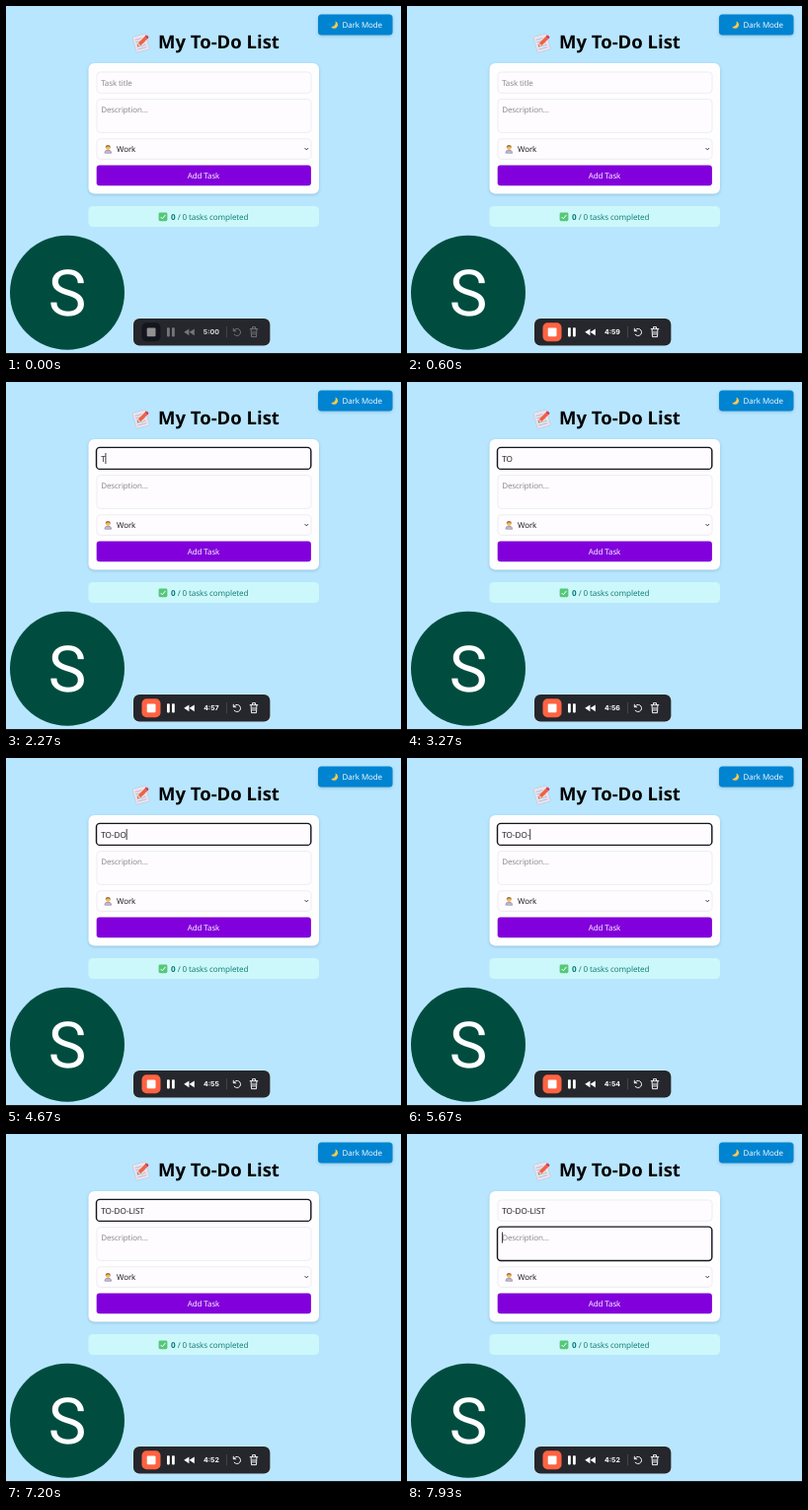
Animation, 400 px wide and 353 px high, one loop 8000 ms. Source, as an HTML page:

```html
<!DOCTYPE html>
<html lang="en">
<head>
<meta charset="utf-8">
<title>My To-Do List</title>
<style>
html, body { margin: 0; width: 100%; height: 100%; overflow: hidden; background: #b8e6fe; }
svg { display: block; width: 400px; height: 353px; }
text {
  font-family: "Open Sans", "Noto Sans", sans-serif;
  font-size: 8px; letter-spacing: -.1px; white-space: pre;
  text-rendering: geometricPrecision;
}
.field { fill: #fefcff; stroke: #e6e5ec; stroke-width: .7; }
.hint { fill: #858585; }
.soft { filter: drop-shadow(0 1px 1.5px rgba(20, 60, 90, .22)); }
#title { font-size: 18.5px; font-weight: 700; letter-spacing: 0; }
#entry { font-size: 8.2px; letter-spacing: 0; }
#count { font-size: 8.15px; }
#initial { font-family: Roboto, sans-serif; font-size: 65px; letter-spacing: 0; }
#clock { font-family: Inter, sans-serif; font-size: 7px; font-weight: 700; letter-spacing: 0; }
</style>
</head>
<body>
<svg viewBox="0 0 400 353">
  <rect width="400" height="353" fill="#b8e6fe"/>
  <rect y="352" width="400" height="1" fill="#1c1c1c"/>

  <!-- theme button -->
  <g class="soft"><rect x="316" y="8.5" width="75.5" height="21" rx="3.5" fill="#0084d1"/></g>
  <path d="M333.6 15.4A3.8 3.8 0 1 1 329.2 21.2A4.6 4.6 0 0 0 333.6 15.4Z" fill="#fbc94a"/>
  <text x="340.6" y="22.1" fill="#fff">Dark Mode</text>

  <!-- heading -->
  <g transform="translate(136.5 37)">
    <g transform="rotate(-15)">
      <rect x="-6.8" y="-7.5" width="13.6" height="16.4" rx="1" fill="#ece4ef" stroke="#b9bfd0" stroke-width=".5"/>
      <path d="M-5-4H2M-5-1.5H4M-5 1H4M-5 3.5H4.5M-5 6H4.5" stroke="#a3b0c8" stroke-width=".7"/>
    </g>
    <g transform="scale(.86)">
      <path d="M-4 4.5L-3 .8L4.5-7L7.6-4L0 3.6Z" fill="#f0613f"/>
      <path d="M4.5-7L6-8.3Q7.3-9 8.5-7.7T9-5.4L7.6-4Z" fill="#d3405b"/>
      <path d="M-4 4.5L-3 .8L0 3.6Z" fill="#f5c69a"/>
      <path d="M-4 4.5L-3.6 3L-2.5 4.1Z" fill="#443"/>
    </g>
  </g>
  <text id="title" x="154" y="43.3">My To-Do List</text>

  <!-- form -->
  <g class="soft"><rect x="83.5" y="58" width="233.5" height="132.5" rx="6" fill="#fffeff"/></g>
  <rect class="field" x="92" y="67" width="217" height="21.3" rx="3.5"/>
  <rect class="field" x="92" y="94.5" width="217" height="33.8" rx="3.5"/>
  <rect class="field" x="92" y="134.8" width="217" height="20.6" rx="3.5"/>
  <rect id="ring" x="91.5" y="66.4" width="217.3" height="22" rx="3.5" fill="none" stroke="#15161c" stroke-width="1.4"/>
  <text id="hint" class="hint" x="96.2" y="80.7">Task title</text>
  <text id="entry" x="96.2" y="80.7" fill="#111"></text>
  <text class="hint" x="96.2" y="108.4">Description...</text>
  <rect id="caret" width=".8" height="11" fill="#111"/>

  <g transform="translate(103.3 145.3) scale(.86)">
    <path d="M-4.4 5Q-4.4 .6 0 .6T4.4 5Z" fill="#ab93c4"/>
    <circle cy="-2" r="2.7" fill="#f7bd45"/>
    <path d="M-2.8-1.6Q-3.2-5 0-5T2.8-1.6Q1.8-3.3 0-3.2T-2.8-1.6Z" fill="#94705a"/>
    <rect x="-2.9" y="1.6" width="5.8" height="3.6" rx=".5" fill="#b4bac3"/>
  </g>
  <text x="112" y="148.4" fill="#111">Work</text>
  <path d="M302.6 144.1l1.7 1.8l1.7-1.8" fill="none" stroke="#222" stroke-width=".9"/>

  <rect x="91.7" y="161.5" width="217.2" height="20.7" rx="3" fill="#8200db"/>
  <text x="200" y="174.8" fill="#fff" text-anchor="middle">Add Task</text>

  <!-- progress -->
  <rect x="83.5" y="203" width="233.5" height="21" rx="4.5" fill="#cdf8fb"/>
  <rect x="154.6" y="209.6" width="8.8" height="8.6" rx="1.4" fill="#55c878"/>
  <path d="M156.6 214l1.8 1.8l3-3.9" fill="none" stroke="#fff" stroke-width="1"/>
  <text id="count" x="167.1" y="216.7" fill="#087a72"><tspan font-weight="700">0</tspan> / 0 tasks completed</text>

  <!-- avatar -->
  <circle cx="62" cy="290.7" r="58" fill="#004d40"/>
  <text id="initial" x="62" y="314" fill="#fff" text-anchor="middle">S</text>

  <!-- recorder -->
  <rect x="129" y="317.1" width="138.4" height="27.4" rx="6" fill="#25272c" stroke="#d2effe" stroke-width="1.2" paint-order="stroke"/>
  <rect id="stop" x="137.5" y="321.2" width="19" height="19" rx="5"/>
  <rect id="square" x="142.7" y="326.4" width="8.8" height="8.8" rx="1.2"/>
  <g id="icons">
    <rect x="163" y="326.2" width="2.8" height="9.2" rx=".8"/>
    <rect x="168" y="326.2" width="2.8" height="9.2" rx=".8"/>
    <path d="M185.4 327.4v6.8l-5.2-3.4ZM190.8 327.4v6.8l-5.2-3.4Z"/>
  </g>
  <text id="clock" x="207.9" y="333.3" text-anchor="middle"></text>
  <path d="M223.5 325v11.5" stroke="#484b52" stroke-width=".8"/>
  <g id="lines" fill="none" stroke-width=".95" stroke-linecap="round" stroke-linejoin="round">
    <path d="M230.6 329.5A3.6 3.6 0 1 1 231.1 333.2M230.3 327.2v2.5h2.5"/>
    <path d="M247.2 327.6h7.6M249.5 327.4v-1.8h3v1.8M248.1 327.8l.4 7.8h5l.4-7.8M250 330v3.4M252 330v3.4"/>
  </g>
</svg>
<script>
const LOOP = 8000;
const FOCUS = 1270, NEXT = 7930, BLINK = 530;
const WORD = "TO-DO-LIST";
const KEYS = [2270, 2730, 3870, 4330, 4670, 5670, 6000, 6200, 6470, 6670];
const TICKS = [70, 1070, 2130, 3070, 4070, 5130, 6070, 7070];
const WAKE = [330, 400, 530, 600];

const el = id => document.getElementById(id);
const set = (id, attrs) => { for (const k in attrs) el(id).setAttribute(k, attrs[k]); };
const passed = (times, t) => times.filter(x => x <= t).length;
const mix = (a, b, k) => `rgb(${a.map((v, i) => Math.round(v + (b[i] - v) * k))})`;

function drawForm(t) {
  const typed = passed(KEYS, t);
  const inBody = t >= NEXT;
  const focused = t >= FOCUS;
  el("entry").textContent = WORD.slice(0, typed);
  set("hint", { visibility: typed ? "hidden" : "visible" });
  set("ring", {
    y: inBody ? 94.1 : 66.4,
    height: inBody ? 34.4 : 22,
    visibility: focused ? "visible" : "hidden"
  });

  // every keystroke restarts the blink
  const since = inBody ? NEXT : typed ? KEYS[typed - 1] : FOCUS;
  const lit = focused && Math.floor((t - since) / BLINK) % 2 === 0;
  const width = typed && !inBody ? el("entry").getComputedTextLength() : 0;
  set("caret", {
    x: 96 + width,
    y: inBody ? 99.6 : 72,
    visibility: lit ? "visible" : "hidden"
  });
}

function drawRecorder(t) {
  const k = passed(WAKE, t) / WAKE.length;
  const ink = mix([116, 118, 122], [255, 255, 255], k);
  set("stop", { fill: mix([20, 22, 29], [255, 98, 66], k) });
  set("square", { fill: mix([145, 145, 148], [255, 255, 255], k) });
  set("icons", { fill: ink });
  set("lines", { stroke: ink });
  set("clock", { fill: mix([215, 216, 218], [255, 255, 255], k) });
  const left = 300 - passed(TICKS, t);
  el("clock").textContent = Math.floor(left / 60) + ":" + String(left % 60).padStart(2, "0");
}

function draw(t) {
  drawForm(t);
  drawRecorder(t);
}

const start = performance.now();
function loop(now) {
  draw(Math.max(0, now - start) % LOOP);
  requestAnimationFrame(loop);
}
draw(0);
requestAnimationFrame(loop);
</script>
</body>
</html>
```
